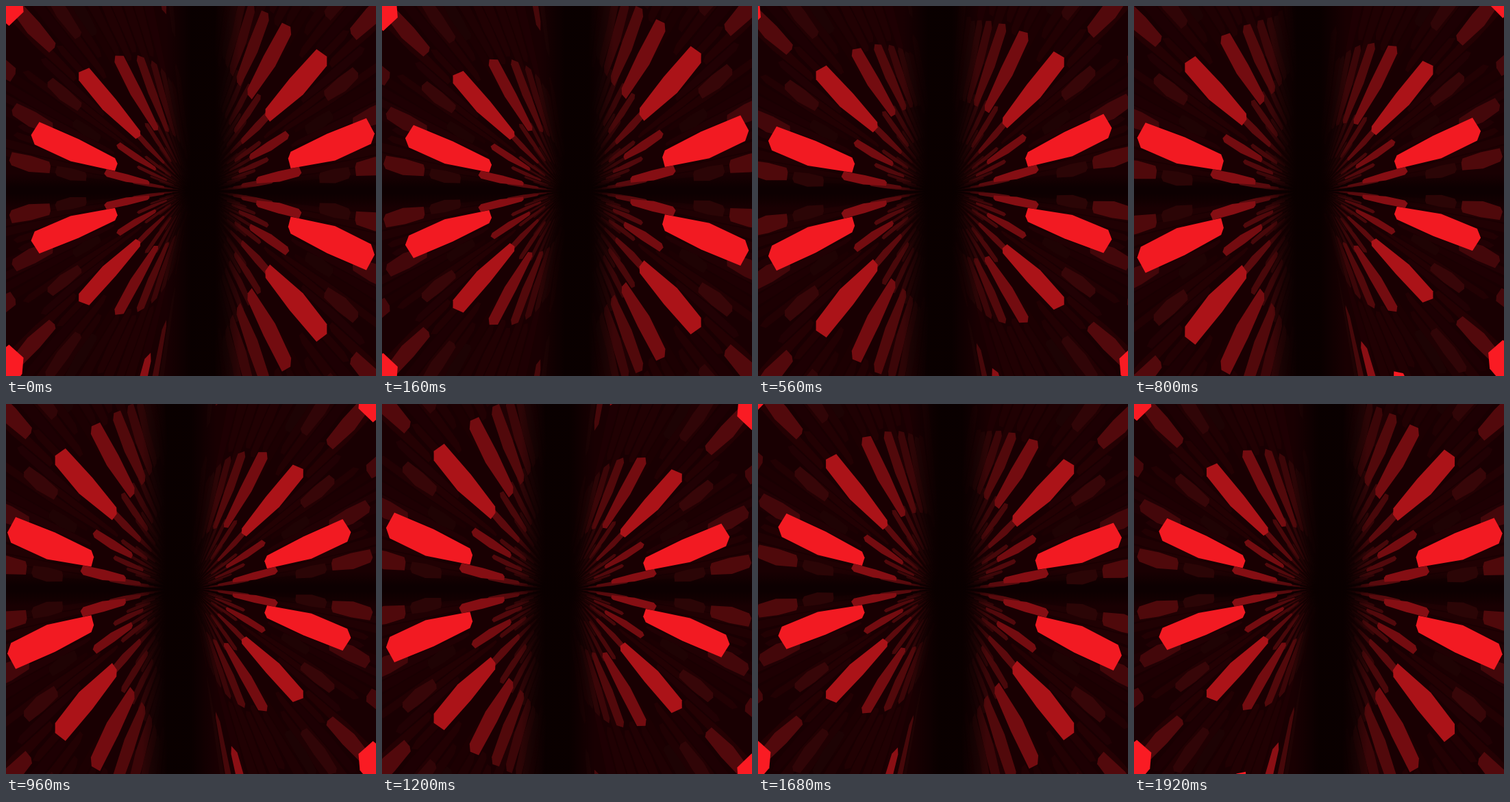
Recreate the animation shown at these times as an HTML page with a canvas. Size 540x540 px, loop 2000 ms.

```html
<!DOCTYPE html>
<html lang="en">
<head>
<meta charset="utf-8">
<title>Red tunnel</title>
<style>
html, body { margin: 0; width: 100%; height: 100%; overflow: hidden; background: #0b0000; }
canvas { display: block; width: 540px; height: 540px; }
</style>
</head>
<body>
<canvas id="stage" width="540" height="540"></canvas>
<script>
const ctx = document.getElementById('stage').getContext('2d');
const SIZE = 540, MID = 270, LOOP = 2000, STEP = 80;

// Outline of one block: [along the radius 0..1, across the angle -1..1].
const OUTLINE = [
  [0, -0.85], [0.5, -1], [0.93, -0.5], [1, 0],
  [0.97, 0.95], [0.5, 1], [0.05, 0.75], [0, 0.2]
];

// Blocks of one quadrant: u = distance from the seam, v = distance from the horizon.
const rays = [], blocks = [];

function block(list, angle, r0, r1, half, shade, alpha = 1) {
  const pts = OUTLINE.map(([k, o]) => {
    const r = r0 + (r1 - r0) * k, a = angle + o * half;
    return [r * Math.cos(a), r * Math.sin(a)];
  });
  const s = Math.min(shade, 1.04);
  list.push({ pts, color: `rgba(${240 * s},${26 * s},${34 * s},${alpha})` });
}

// A wall at depth x: rows of equal height, dimmer as the view gets steeper.
function wall(x, start, step) {
  const light = (1.5 / x) ** 1.25;
  for (let n = 0; n < 14; n++) {
    const angle = Math.atan(start + step * n), c = Math.cos(angle);
    const shade = light * Math.max(1.19 * c - 0.12, 0.22 * c);
    if (shade < 0.11) break;
    const r0 = 198 / x - (x < 1 ? 20 + 14 * n : 0);
    const r1 = (x < 2 ? 396 - 8 * n : 366) / x;
    block(blocks, angle, r0, r1, Math.min(0.15 / x, 0.11) * c, shade);
  }
}

let seed = 11;
function rnd() {
  seed = (seed * 16807) % 2147483647;
  return seed / 2147483647;
}

for (let i = 0; i < 26; i++) {
  const r = 110 + rnd() * 150;
  block(rays, 0.13 + i * 0.052, r, r + 110 + rnd() * 120, 0.024, 0.24, 0.1 + rnd() * 0.25);
}

// Dim blocks seen through the gaps: [slope, inner radius, brightness].
for (const [slope, r, shade] of [
  [1.57, 292, 0.12], [1.33, 300, 0.2], [1, 308, 0.34],
  [0.73, 221, 0.23], [0.63, 325, 0.28], [0.55, 171, 0.13],
  [0.43, 239, 0.28], [0.15, 225, 0.33], [0.12, 171, 0.18]
]) {
  const angle = Math.atan(slope);
  block(blocks, angle, r, r * 1.27, 0.05 * Math.cos(angle), shade);
}

for (let x = 9.5; x > 3; x--) wall(x, 0.45 / x, 1.02 / x);
wall(2.5, 0.18, 0.41);
wall(1.5, 0.33, 0.69);
wall(0.5, 1, 1.68);

function wave(t, peak) {
  return Math.cos((t - peak) / LOOP * Math.PI * 2);
}

function drawQuarter(list, side, up, shift, twist) {
  for (const { color, pts } of list) {
    ctx.beginPath();
    for (const [u, v] of pts) {
      const bend = v * shift + up * twist * (u * u + v * v);
      const d = Math.max(v + side * bend / Math.max(u, 26), 0);
      ctx.lineTo(MID + shift + side * u, MID - up * d);
    }
    ctx.closePath();
    ctx.fillStyle = color;
    ctx.fill();
  }
}

function drawAll(list, shift, twist) {
  for (const side of [-1, 1]) {
    for (const up of [-1, 1]) drawQuarter(list, side, up, shift, twist);
  }
}

function shadow(x0, y0, x1, y1, peak, core) {
  const g = ctx.createLinearGradient(x0, y0, x1, y1);
  g.addColorStop(0, 'rgba(9,0,0,0)');
  g.addColorStop(0.5 - core, `rgba(9,0,0,${peak})`);
  g.addColorStop(0.5 + core, `rgba(9,0,0,${peak})`);
  g.addColorStop(1, 'rgba(9,0,0,0)');
  ctx.fillStyle = g;
  ctx.fillRect(0, 0, SIZE, SIZE);
}

function draw(t) {
  const shift = 17.3 * wave(t, -20);
  const twist = 0.04 * wave(t, 637);
  const cx = MID + shift;
  ctx.fillStyle = '#190002';
  ctx.fillRect(0, 0, SIZE, SIZE);
  drawAll(rays, shift, twist);
  shadow(0, MID - 26, 0, MID + 26, 0.75, 0.08);
  drawAll(blocks, shift, twist);
  shadow(cx - 54, 0, cx + 54, 0, 0.95, 0.16);
}

function tick() {
  const t = performance.now() % LOOP;
  draw(Math.floor(t / STEP + 0.001) * STEP);
  requestAnimationFrame(tick);
}
tick();
</script>
</body>
</html>
```
